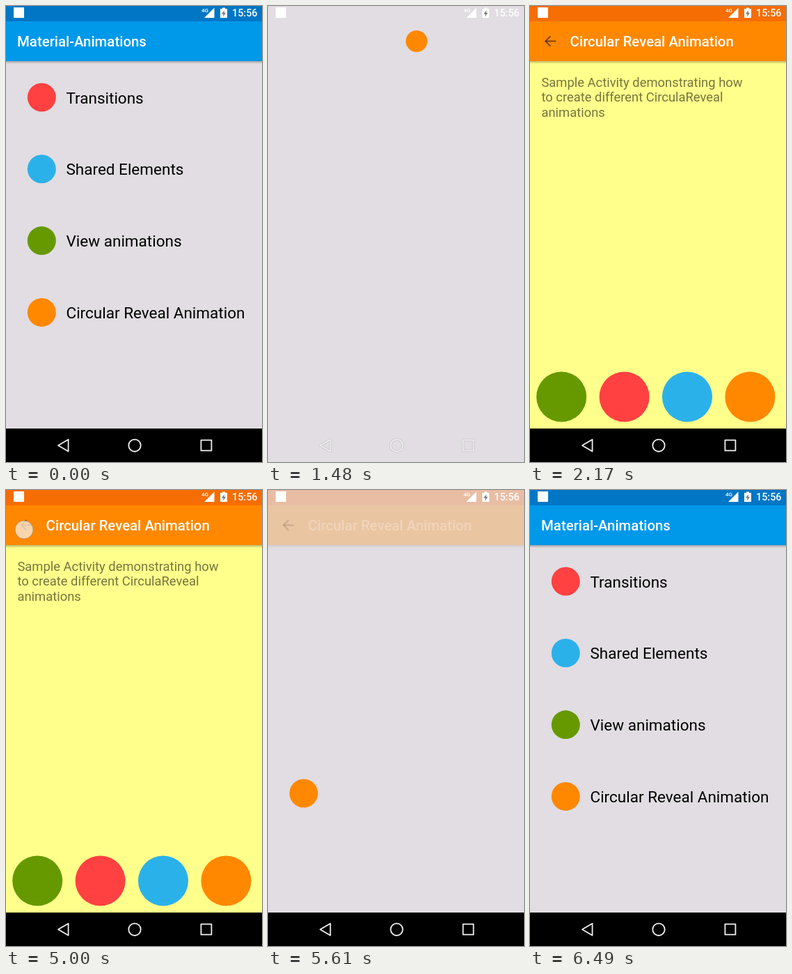
These frames come from a looping animation (368 by 654 pixels, 8000 ms). An HTML page with a canvas:

```html
<!DOCTYPE html>
<html lang="en">
<head>
<meta charset="utf-8">
<title>Material animations</title>
<style>
html, body { margin: 0; width: 368px; height: 654px; overflow: hidden; }
canvas { display: block; }
</style>
</head>
<body>
<canvas id="stage" width="368" height="654"></canvas>
<script>
const c = document.getElementById('stage').getContext('2d');
const W = 368, H = 654, LOOP = 8000, TAU = Math.PI * 2;
const GREY = '#e1dde2', YELLOW = '#ffff8b';
const RED = '#ff4141', BLUE = '#2bb1ea', GREEN = '#669900', ORANGE = '#ff8800';
const ROWS = [
  ['Transitions', RED, 142],
  ['Shared Elements', BLUE, 171],
  ['View animations', GREEN, 170],
  ['Circular Reveal Animation', ORANGE, 215]
];
const BUTTONS = [GREEN, RED, BLUE, ORANGE];
const NOTE = ['Sample Activity demonstrating how', 'to create different CirculaReveal', 'animations'];
const STEPS = [[500, 1220, 9], [1310, 2080, 10], [2170, 2170, 1], [5000, 5700, 9], [5870, 6490, 8]];

const clamp = v => Math.max(0, Math.min(1, v));
const phase = (t, start, length) => clamp((t - start) / length);
const smooth = p => (1 - Math.cos(p * Math.PI)) / 2;
const mix = (a, b, p) => a + (b - a) * p;

function hold(t) {
  let held = 0;
  for (const [first, last, n] of STEPS) {
    if (t < first) break;
    const gap = n > 1 ? (last - first) / (n - 1) : 1;
    held = first + gap * Math.min(n - 1, Math.floor((t - first + 5) / gap));
  }
  return held;
}

function rect(x, y, w, h, fill) {
  c.fillStyle = fill;
  c.fillRect(x, y, w, h);
}

function disc(x, y, r, fill) {
  c.beginPath();
  c.arc(x, y, Math.max(0, r), 0, TAU);
  c.fillStyle = fill;
  c.fill();
}

function text(s, x, y, size, fill, weight = 400) {
  c.font = `${weight} ${size}px Roboto, sans-serif`;
  c.fillStyle = fill;
  c.fillText(s, x, y);
}

function path(points, close) {
  c.beginPath();
  points.forEach(([x, y]) => c.lineTo(x, y));
  if (close) c.closePath();
}

function group(draw, { x = 0, alpha = 1, clip } = {}) {
  if (alpha <= 0) return;
  c.save();
  c.translate(x, 0);
  c.globalAlpha = alpha;
  if (clip) {
    c.beginPath();
    c.arc(clip[0], clip[1], clip[2], 0, TAU);
    c.clip();
  }
  draw();
  c.restore();
}

function toolbar(fill, title, x) {
  const shade = c.createLinearGradient(0, 79, 0, 83);
  shade.addColorStop(0, 'rgba(0,0,0,.28)');
  shade.addColorStop(1, 'rgba(0,0,0,0)');
  rect(0, 79, W, 4, shade);
  rect(0, 22, W, 57, fill);
  text(title, x, 58, 20.4, '#fff', 500);
}

// Views farther from the tapped row leave first and come back last
function slideX(t, x, y) {
  const distance = W - x + Math.abs(439 - y), lag = 167 / W;
  if (t < 3000) return -W * phase(t, 590 + (625 - distance) * lag, 500) ** 2;
  return -W * (1 - phase(t, 5770 + (distance - 153) * lag, 500)) ** 2;
}

function listScreen(t) {
  const slide = (x, y, draw) => group(draw, { x: slideX(t, x, y) });
  slide(184, 11, () => rect(0, 0, W, 22, '#0076c5'));
  slide(184, 51, () => toolbar('#0098e9', 'Material-Animations', 16));
  ROWS.forEach(([label, color, center], i) => {
    const y = 131 + i * 102.8;
    if (i < 3) slide(51, y, () => disc(51.3, y, 20.5, color));
    slide(center, y, () => text(label, 86.5, y + 8.6, 22.5, '#000'));
  });
  if (t < 3000) slide(184, 630, () => rect(0, 606, W, 48, '#000'));
}

function buttons(t, alpha) {
  BUTTONS.forEach((color, i) => {
    const shown = phase(t, 1473 + i * 135, 250) ** 2;
    const left = 1 - smooth(phase(t, 5090, 300));
    const scale = mix(.6, 1, shown) * left;
    group(() => disc(45.2 + i * 90.4, 560.5, 36 * scale, color), { alpha: alpha * shown * left });
  });
}

function arrow() {
  c.strokeStyle = 'rgba(0,0,0,.5)';
  c.lineWidth = 2;
  path([[37.3, 50.5], [22.5, 50.5]]);
  c.stroke();
  path([[29.5, 43.2], [22.2, 50.5], [29.5, 57.8]]);
  c.stroke();
}

function revealScreen(t) {
  const fadeIn = smooth(phase(t, 1490, 300));
  const bars = fadeIn * (1 - smooth(phase(t, 5420, 300)));
  const hide = W * (1 - smooth(phase(t, 5090, 500)));
  const bodyClip = t > 5090 ? [184, 342, hide] : null;
  group(() => {
    rect(0, 0, W, H, YELLOW);
    NOTE.forEach((line, i) => text(line, 16.4, 115.6 + i * 21.6, 18.4, 'rgba(0,0,0,.54)'));
  }, { alpha: fadeIn, clip: bodyClip });
  buttons(t, fadeIn);
  group(() => rect(0, 0, W, 22, '#f66d04'), { alpha: bars });
  const radius = W * phase(t, 1350, 500) ** 2;
  group(() => {
    toolbar(ORANGE, ROWS[3][0], 57.6);
    arrow();
  }, { alpha: bars, clip: t < 1850 ? [185, 50.5, radius] : null });
  group(() => rect(0, 606, W, 48, '#000'), { alpha: fadeIn });
}

function sharedDisc(t) {
  if (t > 1780 && t < 5090) return;
  let p = smooth(phase(t, 860, 480)), end = 439.4;
  if (t > 3000) {
    p = 1 - smooth(phase(t, 5090, 490));
    if (t < 5690) end = 435;
  }
  const arc = (a, b, d, e) => {
    const q = 1 - p;
    return q ** 3 * a + 3 * q * q * p * b + 3 * q * p * p * d + p ** 3 * e;
  };
  disc(arc(51.3, 132, 213.6, 213.6), arc(end, 358, 164, 50.5), mix(20.5, 15.5, p), ORANGE);
}

function touch(x, y) {
  disc(x, y, 13, 'rgba(246,232,212,.8)');
  c.strokeStyle = 'rgba(140,125,110,.55)';
  c.lineWidth = 1;
  c.stroke();
}

function systemIcons() {
  rect(11, 2, 15, 15, '#fff');
  text('4G', 281, 9, 8, '#fff', 500);
  path([[285, 17], [299.5, 17], [299.5, 2.5]], true);
  c.fill();
  rect(308, 4, 10, 13, '#fff');
  rect(311, 2.5, 4, 2, '#fff');
  path([[314, 6], [310, 11.5], [312.6, 11.5], [312, 15.5], [316, 9.8], [313.4, 9.8]], true);
  c.fillStyle = '#777';
  c.fill();
  text('15:56', 325, 15, 14.4, '#fff', 500);

  c.save();
  c.strokeStyle = '#f0f0f0';
  c.lineWidth = 1.8;
  c.lineJoin = 'round';
  c.shadowColor = 'rgba(0,0,0,.3)';
  c.shadowBlur = 1.5;
  path([[75, 630.3], [89.6, 621.8], [89.6, 638.8]], true);
  c.stroke();
  c.beginPath();
  c.arc(185, 630.3, 8.7, 0, TAU);
  c.stroke();
  c.strokeRect(280.4, 622.7, 15, 15);
  c.restore();
}

function draw(t) {
  rect(0, 0, W, H, GREY);
  if (t < 1480 || t > 5720) listScreen(t);
  if (t > 1480 && t < 5720) revealScreen(t);
  if (t > 5720) rect(0, 606, W, 48, '#000');
  sharedDisc(t);
  if (t >= 500 && t < 600) touch(200, 445);
  if (t >= 5000 && t < 5080) touch(26, 57);
  systemIcons();
}

const begin = performance.now();
function frame() {
  draw(hold((performance.now() - begin) % LOOP));
  requestAnimationFrame(frame);
}
frame();
</script>
</body>
</html>
```
